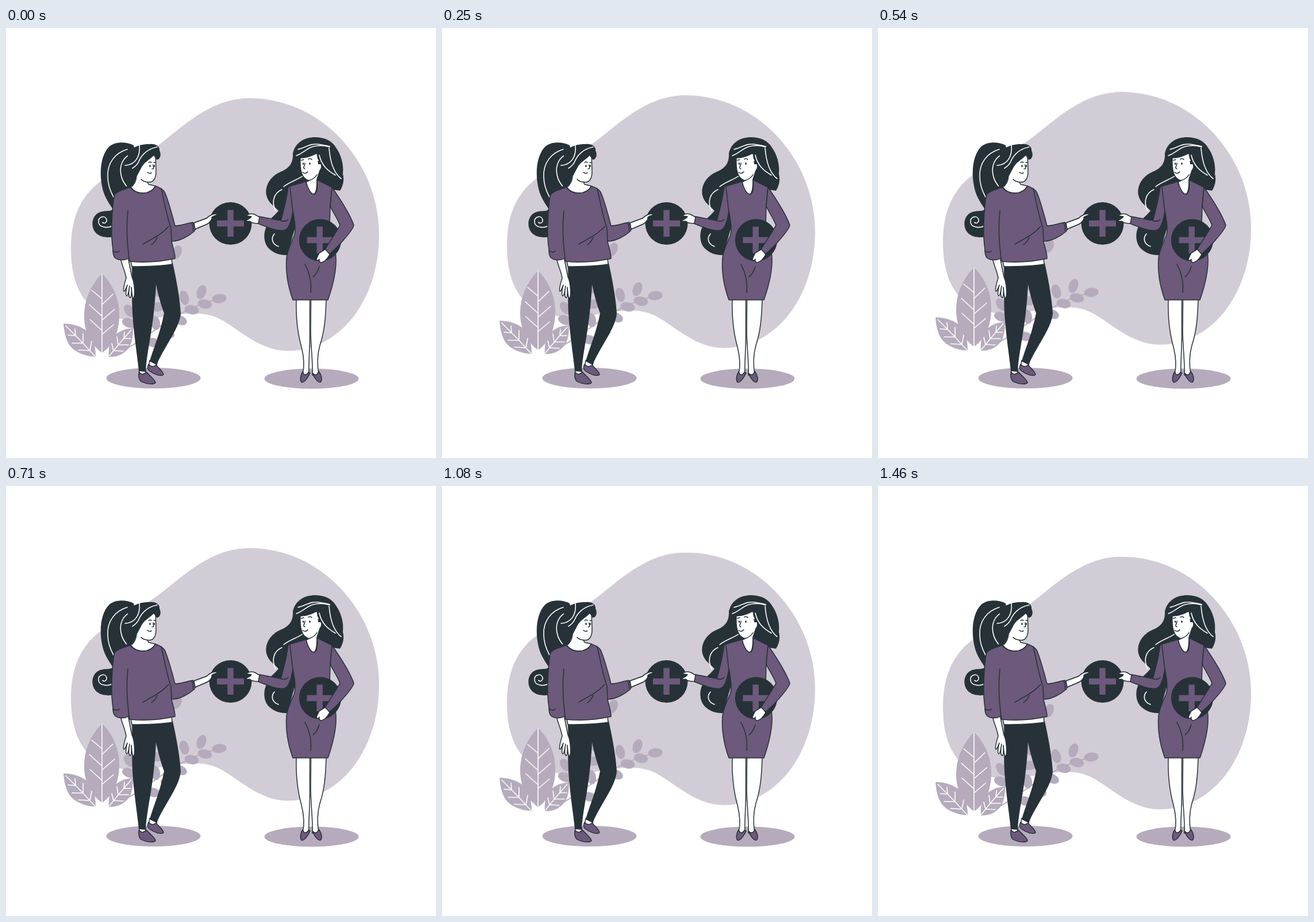
Animation, 748 px wide and 748 px high, one loop 1.5 s. Source, as an HTML page without scripts:

```html
<!DOCTYPE html>
<html lang="en">
<head>
<meta charset="utf-8">
<title>Sharing</title>
<style>
  html, body { margin: 0; width: 100%; height: 100%; overflow: hidden; background: #fff; }
  svg { display: block; width: 100%; height: 100%; }
  .blob { fill: #d2ccd6; }
  .plant { fill: #b5abbc; }
  .stem { fill: none; stroke: #b5abbc; stroke-width: 1.8; }
  .vein { fill: none; stroke: #fff; stroke-width: 1.6; stroke-linecap: round; }
  .dark { fill: #263238; }
  .cross { fill: none; stroke: #6c597b; stroke-width: 10.5; }
  .ink { stroke: #263238; stroke-width: 1.5; stroke-linecap: round; stroke-linejoin: round; }
  .skin { fill: #fff; }
  .line { fill: none; }
  .cloth { fill: #6c597b; }

  /* 24 steps per second, up and back down */
  .float { animation: float 1.5s -10ms infinite; }
  @keyframes float {
    0%, 100% { transform: translateY(0); animation-timing-function: steps(18, start); }
    50% { transform: translateY(-14.96px); animation-timing-function: steps(18, start); }
  }
</style>
</head>
<body>
<svg viewBox="0 0 748 748">
  <defs>
    <ellipse id="leaf" rx="12.5" ry="8"/>
    <path id="reach" class="skin ink" d="M327 339L349 331C354 326 360 323 367 323C369 325 361 327 358 329C359 333 355 338 350 341L329 350Z"/>
  </defs>

  <g class="float">
    <path class="blob" d="M113 385C113 330 130 290 172 262C200 244 240 224 270 201C315 165 360 123 424 123C550 123 649 235 649 360C649 475 580 562.5 490 562.5C440 562 405 524 370 506C340 492 310 498 280 502C230 512 190 512 155 490C125 470 113 430 113 385Z"/>
    <g class="plant">
      <path class="stem" d="M190 567C245 548 285 490 376 471M192 562C225 520 265 460 296 390"/>
      <use href="#leaf" transform="translate(371 471.5) rotate(-5)"/>
      <use href="#leaf" transform="translate(340 460) rotate(-70)"/>
      <use href="#leaf" transform="translate(346 481) rotate(12)"/>
      <use href="#leaf" transform="translate(310 470) rotate(-105)"/>
      <use href="#leaf" transform="translate(323 491) rotate(12)"/>
      <use href="#leaf" transform="translate(303 509) rotate(25)"/>
      <use href="#leaf" transform="translate(281 532) rotate(20)"/>
      <use href="#leaf" transform="translate(256 548) rotate(12)"/>
      <use href="#leaf" transform="translate(285 489) rotate(-105)"/>
      <use href="#leaf" transform="translate(260 514) rotate(-100)"/>
      <use href="#leaf" transform="translate(297 391) rotate(-65)"/>
      <use href="#leaf" transform="translate(264 456) rotate(-95)"/>
      <use href="#leaf" transform="translate(264 486) rotate(-5)"/>
      <use href="#leaf" transform="translate(249 508) rotate(5)"/>
      <use href="#leaf" transform="translate(215 493) rotate(50)"/>
      <use href="#leaf" transform="translate(214 514) rotate(20)"/>
      <use href="#leaf" transform="translate(228 482) rotate(65)"/>
      <path d="M167 428C147 449 136 474 136 502C136 532 149 553 167 566C186 553 197 530 197 501C197 473 187 448 167 428Z"/>
      <path d="M100 515C118 515 135 521 145 532C153 543 156 557 156 573C138 572 119 565 110 552C103 540 101 528 100 515Z"/>
      <path d="M221 523C203 524 190 531 184 543C179 553 178 563 179 573C192 574 206 568 214 557C220 547 221 534 221 523Z"/>
    </g>
    <path class="vein" d="M167 429V566M167 482L186 464M167 509L189 490M167 534L187 517M167 472L149 457M167 502L145 482M167 527L146 508M104 519Q131 545 155 572M121 536L120 524M134 549L134 532M146 562L149 546M121 536L108 535M134 549L115 549M146 562L126 561M218 526Q200 546 180 571M205 541L206 530M195 552L193 538M187 562L184 550M205 541L217 541M195 552L213 552M187 562L204 563"/>
  </g>

  <ellipse class="plant" cx="256.5" cy="609" rx="82" ry="18"/>
  <ellipse class="plant" cx="531.5" cy="610" rx="82" ry="17.5"/>

  <g id="left-woman">
    <path class="dark" d="M222 204C210 198 191 197 180 206C165 220 162 250 167 275C170 292 178 303 185 314C186 321 170 316 160 322C148 329 147 349 158 358C168 366 182 365 192 362L195 300L220 278L230 240Z"/>
    <path class="vein" d="M211 211C190 217 176 235 177 258C177 274 182 285 187 294M219 219C203 224 197 240 200 255C202 266 207 273 213 278M185 344C177 349 162 347 161 338C160 328 172 325 175 333C176 339 170 341 168 338"/>
    <path class="skin ink" d="M226 250C228 262 226 270 217 277C228 291 250 291 260 275L248 272L246 268C256 270 261 262 261 250L260 216L240 222Z"/>
    <path class="line ink" d="M246 268Q238 267 235 263"/>
    <path class="dark" d="M212 218C222 204 238 202 250 202C260 201 268 206 267 213C271 221 268 229 262 229L257 222C250 229 240 234 236 242C232 250 228 256 226 262L221 275L210 281Z"/>
    <path class="vein" d="M232 204C234 224 225 238 207 239M263 207C247 210 236 220 231 232Q228 239 220 244"/>
    <path class="line ink" d="M248 234q3-2 5 0M257 234l3 0M256 238C256 243 259 245 254 245M246 251Q249 254 253 252"/>
    <ellipse class="dark" cx="250.5" cy="240" rx="1.3" ry="2"/>
    <ellipse class="dark" cx="258" cy="240" rx="1.1" ry="2"/>

    <path class="skin ink" d="M232 593L231 603L243 604L243 594ZM250 578L248 590L261 592L263 581Z"/>
    <path class="dark" d="M219 412C220 445 218 480 221 510C224 545 229 575 231 597L243 598C245 558 257 525 261 446C266 470 271 485 275 496C268 532 257 555 250 580L262 586C276 553 301 524 304 497C303 475 297 440 290 409Z"/>
    <path class="cloth ink" d="M232 599C230 605 231 610 234 614C240 618 255 622 260 617C260 612 249 604 244 598Q238 606 232 599Z"/>
    <path class="cloth ink" d="M248 585C245 590 246 594 250 597C257 602 269 607 274 603C274 598 265 591 261 586Q254 592 248 585Z"/>

    <path class="skin ink" d="M199 401C203 416 208 426 209 435C206 445 203 454 205 458C207 459 209 451 211 447C208 457 208 465 210 466C213 466 214 453 215 449C213 459 213 468 216 469C219 469 218 455 218 451C219 461 219 470 222 470C225 466 224 443 219 433L212 398Z"/>
    <path class="skin ink" d="M217 405L219 415C245 415 270 414 289 411L288 400Z"/>
    <use href="#reach"/>
    <path class="cloth ink" d="M216 277C205 281 191 284 188 292C184 320 182 362 186 385C186 396 188 402 197 403C203 404 210 403 214 400L215 406C245 409 272 406 294 401C294 390 290 382 288 371C302 371 318 362 327 354L330 349L325 338C314 340 303 344 294 344C288 320 279 290 275 284C271 279 265 277 260 275C251 291 227 291 216 277Z"/>
    <path class="line ink" d="M212 318C209 345 210 370 214 400M270 279C276 305 280 330 287 348L288 371M238 376C252 368 271 359 283 345M253 377Q260 372 263 364M186 388Q194 392 197 388M323 340Q327 345 325 352"/>
  </g>

  <g id="right-woman">
    <path class="dark" d="M538 190C518 190 503 200 499 218C500 238 490 245 476 251C459 259 450 275 453 291C456 304 466 309 474 318C466 328 455 334 454 344C449 352 447 366 453 378C460 390 476 396 489 395L505 340L560 280L581 283C588 272 588 262 586 254C588 236 582 219 574 208C567 196 554 190 538 190Z"/>
    <path class="vein" d="M483 276C495 266 512 263 522 253M469 318C461 302 466 287 480 281M474 380C463 376 460 366 467 358"/>
    <path class="skin ink" d="M512 226C511 245 513 258 522 263Q526 266 528 265L522 268C523 279 531 290 536 289C541 286 541 272 541 263L546 248C551 242 549 234 544 235L540 218C530 223 522 226 512 226Z"/>
    <path class="line ink" d="M528 265Q537 262 541 255"/>
    <path class="dark" d="M503 224C520 229 535 223 541 216L543 237L550 237L562 214L540 204L512 208Z"/>
    <path class="vein" d="M505 222C519 217 524 207 540 205Q552 203 563 207M508 211C522 208 530 199 548 203Q556 204 563 206M562 209C564 234 571 253 583 262M545 221C549 240 561 249 573 256M540 220Q540 226 543 231"/>
    <path class="line ink" d="M514 230l4-1M526 228q4-2 6 1M520 235C520 241 515 243 520 245M516 251Q521 255 525 250"/>
    <ellipse class="dark" cx="517" cy="236" rx="1.2" ry="2"/>
    <ellipse class="dark" cx="528.5" cy="236" rx="1.3" ry="2"/>

    <path class="skin ink" d="M505 472C504 505 507 530 514 555C519 575 519 590 516 603L527 604C526 582 529 555 528.5 525L528.5 472Z"/>
    <path class="skin ink" d="M530.5 472L530 525C530 555 534 580 533 604L544 603C541 585 541 570 546 552C554 528 556 505 557 472Z"/>
    <path class="cloth ink" d="M516 598C512 604 511 612 514 616C519 618 526 607 529 600L526 599Q520 608 516 598Z"/>
    <path class="cloth ink" d="M533 600C536 608 542 617 547 616C551 612 549 604 544 597Q540 608 533 600Z"/>

    <path class="cloth ink" d="M522 267L491 276C488 298 483 318 478 335L441 328L438 340C455 347 473 354 484 352C492 350 496 338 499 318C502 335 505 350 501 362C495 376 489 388 488 400C486 425 490 448 499 473L560 473C568 450 575 425 574 400C574 385 565 365 563 345L564 310L567 277L541 264C542 276 541 288 536 289C530 290 524 277 522 267Z"/>
    <path class="line ink" d="M494 277L499 320M520 411C527 424 532 440 530 460M545 415Q541 428 534 433M478 335Q486 338 491 333"/>
  </g>

  <circle class="dark" cx="390.5" cy="340" r="37"/>
  <path class="cross" d="M367 340H414M390.5 316.5V363"/>
  <circle class="dark" cx="546.5" cy="369" r="36.7"/>
  <path class="cross" d="M523.5 369H568M545.7 345.5V392"/>

  <g id="hands">
    <use href="#reach"/>
    <path class="skin ink" d="M441 329L432 324C427 322 421 324 418 326C420 328 424 327 427 328C425 332 420 333 417 335C418 337 421 336 424 336C427 340 434 340 439 340Z"/>
    <path class="skin ink" d="M557 384C550 389 544 390 543 395L540 402C541 406 544 404 545 402C544 408 548 409 551 407C557 405 560 399 563 394Z"/>
    <path class="cloth ink" d="M567 277C583 300 598 323 605 343C604 351 588 368 578 379L563 393L555 385C563 372 574 356 581 343C576 330 569 321 564 310Z"/>
  </g>
</svg>
</body>
</html>
```
